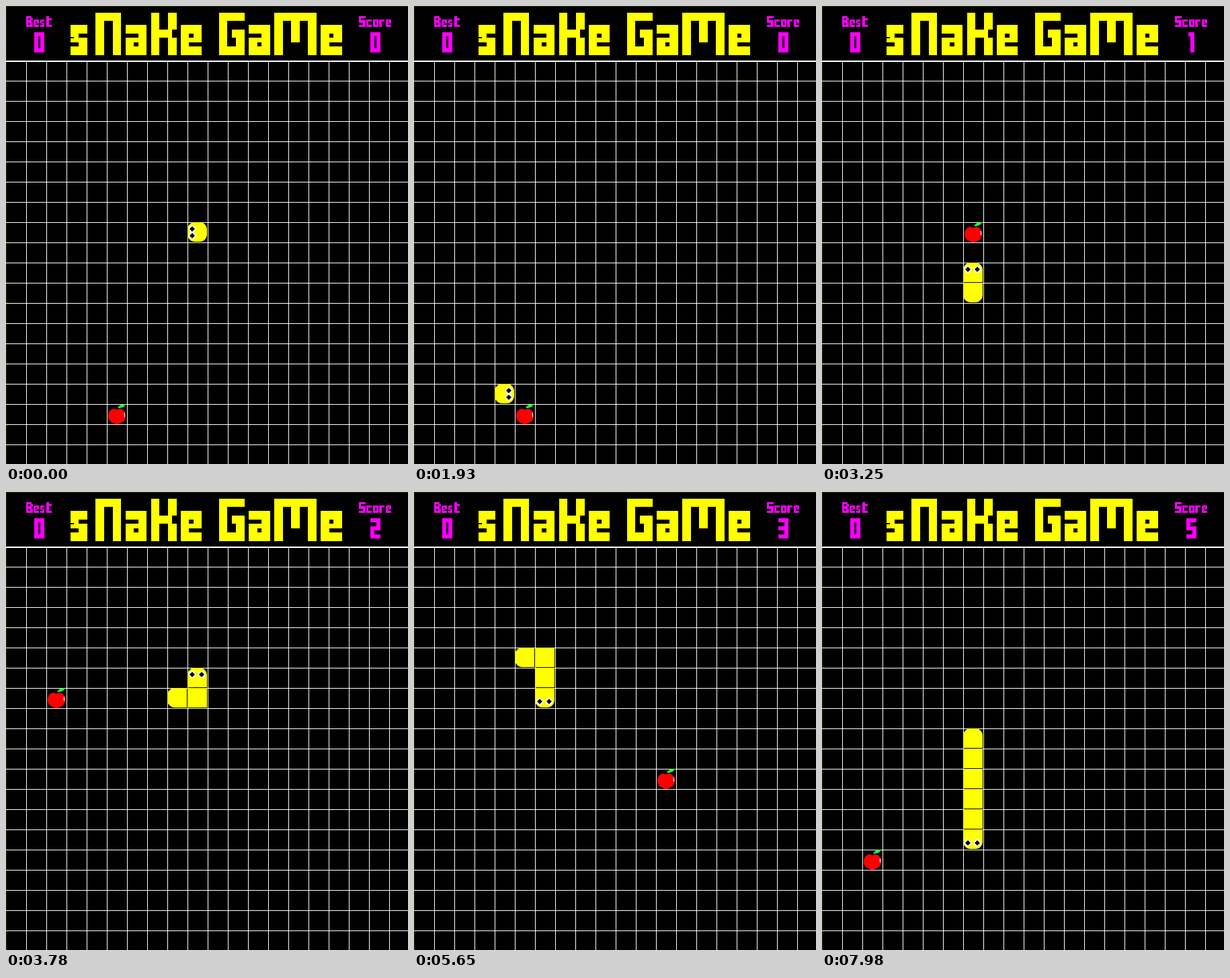
Write an HTML page with a canvas that moves like this. It is 598 px wide and 680 px high and loops after 8 s.

```html
<!DOCTYPE html>
<html lang="en">
<head>
<meta charset="utf-8">
<title>Snake Game</title>
<style>
  html, body { margin: 0; width: 100%; height: 100%; overflow: hidden; background: #000; }
  canvas { display: block; }
</style>
</head>
<body>
<canvas id="stage" width="598" height="680" role="img" aria-label="Snake game with best score and score"></canvas>
<script>
const ctx = document.getElementById('stage').getContext('2d');
const W = 598, H = 680, CELL = 30, TOP = 81;
const LOOP = 8000, STEP = 100, LEAD = 30;
const YELLOW = '#ff0', MAGENTA = '#f0f';

// Block lettering: pairs of repeat count and row pattern, aligned to the baseline.
const GLYPHS = {
  s: '2 #### 1 ##.. 1 #### 1 ..## 2 ####',
  a: '2 ##### 1 ...## 1 ##### 1 ##.## 2 #####',
  e: '2 ##### 1 ##.## 1 ##### 1 ##... 2 #####',
  c: '2 ##### 3 ##... 2 #####',
  o: '2 ##### 3 ##.## 2 #####',
  r: '2 ##### 5 ##...',
  t: '2 ##... 2 ##### 4 ##... 2 #####',
  N: '2 ###### 8 ##..##',
  K: '4 ##..## 2 #####. 4 ##..##',
  G: '2 ###### 2 ##.... 2 ##.### 2 ##..## 2 ######',
  M: '2 ########## 5 ##..##..## 3 ##......##',
  B: '2 #####. 2 ##..## 2 #####. 2 ##..## 2 ######',
  S: '2 ###### 2 ##.... 2 ###### 2 ....## 2 ######',
  0: '2 ##### 6 ##.## 2 #####',
  1: '2 ### 8 .##',
  2: '2 ##### 2 ...## 2 ##### 2 ##... 2 #####',
  3: '2 ##### 2 ...## 2 ##### 2 ...## 2 #####',
  4: '4 ##.## 2 ##### 4 ...##',
  5: '2 ##### 2 ##... 2 ##### 2 ...## 2 #####'
};
const ADVANCE = { s: 6, a: 6, e: 6, c: 6, o: 6, r: 6, t: 6, M: 11, ' ': 3, 1: 4 };
const advance = ch => ADVANCE[ch] || (/\d/.test(ch) ? 6 : 7);

function drawText(text, x, base, unit, color) {
  ctx.fillStyle = color;
  for (const ch of text) {
    const parts = (GLYPHS[ch] || '').split(' ');
    let y = base;
    for (let i = parts.length - 2; i >= 0; i -= 2) {
      const h = parts[i] * unit;
      const top = Math.round(y - h), bottom = Math.round(y);
      for (const run of parts[i + 1].matchAll(/#+/g)) {
        const left = Math.round(x + run.index * unit);
        const right = Math.round(x + (run.index + run[0].length) * unit);
        ctx.fillRect(left, top, right - left, bottom - top);
      }
      y -= h;
    }
    x += advance(ch) * unit;
  }
}

function drawNumber(n, center) {
  const text = String(n);
  drawText(text, center - (advance(text) - 1) * 1.5, 69, 3, MAGENTA);
}

// Head positions, one per step.
const DIRS = { L: [-1, 0], R: [1, 0], U: [0, -1], D: [0, 1] };
const ROUTE = 'L8 D8 R4 D2 R2 U11 R2 U1 L3 D1 L5 U2 R5 D6 R7 U2 L6 D5';
const path = [{ x: 9, y: 8, dir: 'L' }];
for (const leg of ROUTE.split(' ')) {
  const dir = leg[0], [dx, dy] = DIRS[dir];
  for (let i = +leg.slice(1); i > 0; i--) {
    const p = path[path.length - 1];
    path.push({ x: p.x + dx, y: p.y + dy, dir });
  }
}

const APPLES = [[5, 17], [7, 8], [2, 7], [12, 11], [13, 9], [2, 15]];
const scores = [];
path.reduce((score, p) => {
  const [ax, ay] = APPLES[score];
  if (p.x === ax && p.y === ay) score++;
  scores.push(score);
  return score;
}, 0);

function drawGrid() {
  ctx.fillStyle = '#000';
  ctx.fillRect(0, 0, W, H);
  ctx.fillStyle = '#2b2b00';
  ctx.fillRect(0, 0, W, 1);
  ctx.fillRect(0, 0, 1, H);
  ctx.fillStyle = '#fff';
  for (let x = CELL; x < W; x += CELL) ctx.fillRect(x, TOP, 1, H - TOP);
  for (let y = TOP; y < H; y += CELL) ctx.fillRect(0, y, W, 1);
  ctx.fillRect(0, TOP, W, 2);
}

function drawHeader(score) {
  drawText('sNaKe GaMe', 95.5, 72.7, 6.32, YELLOW);
  ctx.fillStyle = '#000';
  ctx.fillRect(95, 46, 6, 2);
  drawText('Best', 30, 31, 1.6, MAGENTA);
  drawText('Score', 525, 31, 1.6, MAGENTA);
  drawNumber(0, 49.5);
  drawNumber(score, 549.5);
}

function ellipse(x, y, rx, ry, color, turn = 0) {
  ctx.fillStyle = color;
  ctx.beginPath();
  ctx.ellipse(x, y, rx, ry, turn, 0, Math.PI * 2);
  ctx.fill();
}

function drawApple([col, row]) {
  ctx.save();
  ctx.translate(col * CELL, TOP + row * CELL);
  ellipse(10.5, 17.5, 8.5, 10.5, '#f00');
  ellipse(19.5, 17.5, 8.5, 10.5, '#f00');
  ellipse(15, 20.5, 9, 9.5, '#f00');
  ctx.fillStyle = '#000';
  ctx.fillRect(14, 4, 2, 4);
  ctx.fillStyle = '#fff';
  ctx.fillRect(26, 13, 1, 6);
  ctx.fillStyle = '#2f2';
  ctx.beginPath();
  ctx.moveTo(16, 6);
  ctx.quadraticCurveTo(18, 0, 28, 0);
  ctx.quadraticCurveTo(26, 6, 16, 6);
  ctx.fill();
  ctx.restore();
}

// Corner order: top left, top right, bottom right, bottom left.
const CORNERS = { L: [0, 3], R: [1, 2], U: [0, 1], D: [2, 3] };
const BACK = { L: 'R', R: 'L', U: 'D', D: 'U' };
const EYES = {
  L: [[7, 10], [7, 20]], R: [[21, 10], [21, 20]],
  U: [[7, 10], [21, 10]], D: [[7, 20], [21, 20]]
};

function drawSegment(p, roundSides) {
  const radii = [0, 0, 0, 0];
  for (const side of roundSides) for (const i of CORNERS[side]) radii[i] = 11;
  ctx.fillStyle = YELLOW;
  ctx.beginPath();
  ctx.roundRect(p.x * CELL, TOP + p.y * CELL, CELL - 1, CELL - 1, radii);
  ctx.fill();
}

function drawEyes(head) {
  for (const [ex, ey] of EYES[head.dir]) {
    const x = head.x * CELL + ex, y = TOP + head.y * CELL + ey;
    ellipse(x, y, 5.3, 5.3, '#fff');
    ctx.fillStyle = '#000';
    ctx.beginPath();
    ctx.moveTo(x - 4, y);
    ctx.lineTo(x, y - 4);
    ctx.lineTo(x + 4, y);
    ctx.lineTo(x, y + 4);
    ctx.fill();
  }
}

function drawSnake(step, length) {
  const tail = Math.max(0, step - length + 1);
  for (let i = tail; i <= step; i++) {
    const sides = [];
    if (i === step) sides.push(path[i].dir);
    if (i === tail) sides.push(BACK[path[Math.min(i + 1, step)].dir]);
    drawSegment(path[i], sides);
  }
  drawEyes(path[step]);
}

function frame(now) {
  const t = now % LOOP;
  const step = Math.min(path.length - 1, Math.floor((t + LEAD) / STEP));
  const score = scores[step];
  drawGrid();
  drawHeader(score);
  drawApple(APPLES[score]);
  drawSnake(step, score + 1);
  requestAnimationFrame(() => frame(performance.now() - start));
}

const start = performance.now();
frame(0);
</script>
</body>
</html>
```
